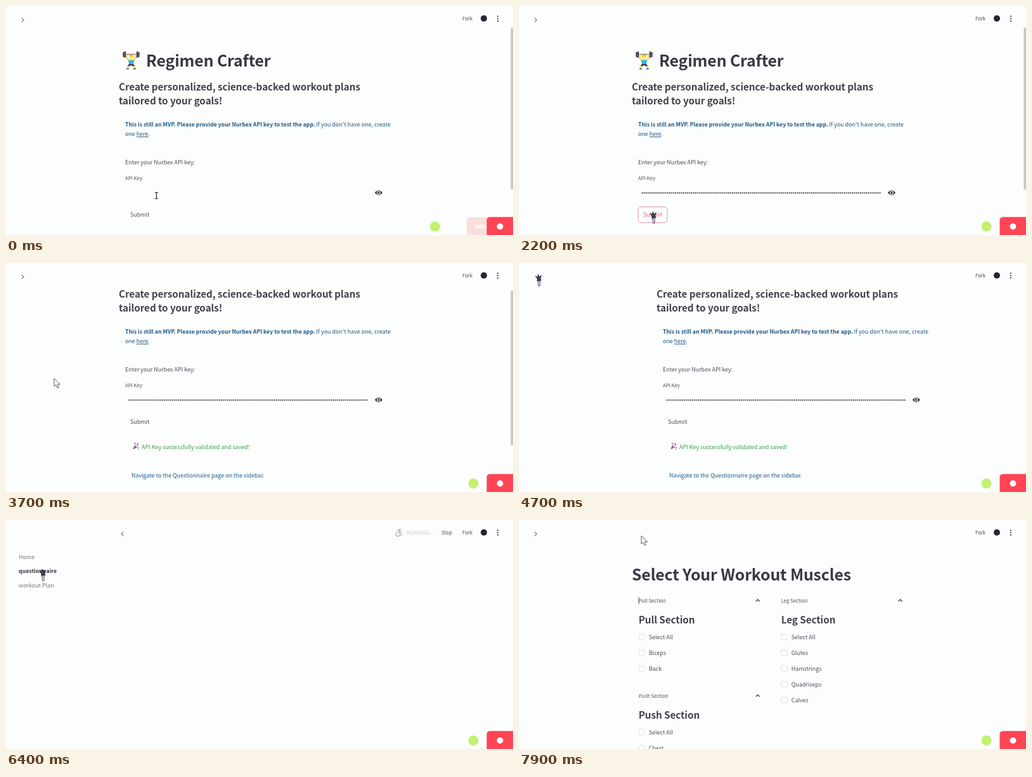
Animation, 800 px wide and 363 px high, one loop 8 s. Source, as an HTML page:

```html
<!DOCTYPE html>
<html lang="en">
<head>
<meta charset="utf-8">
<title>Regimen Crafter</title>
<style>
html, body { margin: 0; width: 100%; height: 100%; overflow: hidden; background: #fcfefd; }
svg { display: block; width: 800px; height: 363px; }
text { font: 8.95px "Noto Sans CJK JP", "Noto Sans CJK SC", "Noto Sans CJK", sans-serif; fill: #4c4d57; white-space: pre; }
.h1 { font-size: 24.8px; font-weight: 700; letter-spacing: -.12px; fill: #393842; }
.h3 { font-size: 15.25px; font-weight: 700; letter-spacing: -.07px; fill: #43424c; }
.small { font-size: 7.75px; }
.info, .info tspan { fill: #1f5684; }
.strong { font-size: 8.73px; font-weight: 700; }
.hint { font-size: 6.68px; font-style: italic; fill: #a3a4aa; }
.nav { fill: #74757d; }
.nav.on { font-size: 8.75px; font-weight: 700; fill: #31333f; }
.line { fill: none; stroke: #73747c; stroke-width: 1.1; }
.box { fill: #fdfefe; stroke: #dcdde2; }
</style>
</head>
<body>
<svg viewBox="0 0 800 363">
  <rect width="800" height="363" fill="#fcfefd"/>

  <g id="home">
    <g id="lifter">
      <path d="M184 76.5H211" stroke="#6a6674" stroke-width="1.2"/>
      <path d="M185.5 73V81M188 72V82M207 72V82M209.500 73V81" stroke="#453a55" stroke-width="2.2"/>
      <path d="M191.500 76.500L190.500 82.500L194 87M203.500 76.500L204.500 82.500L201 87" fill="none" stroke="#f8d648" stroke-width="2.2"/>
      <path d="M193 85.500H202L201 92.500H194Z" fill="#35b5dc"/>
      <circle cx="197.500" cy="81" r="3.500" fill="#fbe36a"/>
      <path d="M194 80A3.500 3.500 0 0 1 201 80Z" fill="#e8bd2c"/>
      <path d="M194 92H201L204 95.500H200L197.500 94L195 95.500H191Z" fill="#39405c"/>
      <path d="M191.500 94.500L193 99M203.500 94.500L202 99" stroke="#f8d648" stroke-width="2.2"/>
      <path d="M190 99.500H194M201 99.500H205" stroke="#39405c" stroke-width="1.4"/>
    </g>
    <text class="h1" x="221" y="96">Regimen Crafter</text>
    <text class="h3" x="178" y="134">Create personalized, science-backed workout plans</text>
    <text class="h3" x="178" y="155.500">tailored to your goals!</text>
    <text class="info strong" x="188" y="191">This is still an MVP. Please provide your Nurbex API key to test the app.</text>
    <text class="info" x="489.500" y="191">If you don't have one, create</text>
    <text class="info" x="188" y="206">one <tspan text-decoration="underline">here</tspan>.</text>
    <text x="188" y="250.700">Enter your Nurbex API key:</text>
    <text class="small" x="188" y="276">API Key</text>
    <rect id="field" x="188" y="283.500" width="420" height="25" rx="5" fill="none" stroke="#dc8fa4"/>
    <path id="dots" d="M194.500 296.300H572" stroke="#3b3c47" stroke-width="2.2" stroke-linecap="round" stroke-dasharray="0 3.1"/>
    <text id="hint" class="hint" x="521" y="304.500">Press Enter to submit form</text>
    <path d="M582 296Q588 288.500 594 296Q588 303.500 582 296Z" fill="#31333f"/>
    <circle cx="588" cy="296" r="2.300" fill="#31333f" stroke="#fcfefd" stroke-width="1.100"/>
    <rect id="button" x="188" y="318.500" width="46" height="25" rx="5" fill="none" stroke="#dc9aa9"/>
    <text id="submit" x="196" y="334.300">Submit</text>
    <g id="success">
      <path d="M200 374.500L203 367.500L207 371.500Z" fill="#8a6a9c"/>
      <path d="M204 367L205 364.500M206 369L209 366M207 371L210 371.500" stroke="#d2507a" stroke-width="1.200"/>
      <path d="M202 365H203.500M207 365H208.500M208 374H209.500" stroke="#3f78c0" stroke-width="1.400"/>
      <text x="214" y="374" style="fill:#3a9d55">API Key successfully validated and saved!</text>
      <text class="info" x="198" y="419.300">Navigate to the Questionnaire page on the sidebar.</text>
    </g>
  </g>

  <g id="muscles">
    <text class="h1" x="178" y="96">Select Your Workout Muscles</text>
  </g>

  <rect width="800" height="37" fill="#fcfefd"/>
  <path id="open" class="line" d="M24.500 18.700L28 22L24.500 25.300"/>
  <g id="side">
    <path class="line" d="M185.500 18.700L182 22L185.500 25.300"/>
    <text class="nav" x="20" y="61.700">Home</text>
    <text class="nav" x="20" y="84.300">questionnaire</text>
    <text class="nav" x="20" y="106.800">workout Plan</text>
  </g>
  <g id="running">
    <circle cx="621.500" cy="15" r="1.300" fill="#a5a6ab"/>
    <path d="M616.500 17L620.500 16.500L619.500 20.500L623.500 21.500V25.500M621 18L625 18.500M617 19.500A3.300 3.300 0 1 0 621.500 23.500" fill="none" stroke="#a5a6ab" stroke-width="1.200"/>
    <text class="small" x="632" y="23" style="font-size:8.05px;fill:#cbccd0">RUNNING...</text>
    <text class="small" x="687" y="23">Stop</text>
  </g>
  <text class="small" x="720" y="22.800">Fork</text>
  <circle cx="754" cy="19.800" r="5" fill="#25262f"/>
  <path d="M776 16.300V24" stroke="#31333f" stroke-width="2.200" stroke-linecap="round" stroke-dasharray="0 3.700"/>
  <rect id="thumb" x="796.500" width="3.500" rx="1.500" fill="#c4c6c8"/>

  <g id="flap">
    <path d="M0 363V340Q0 335 5 335H60V363Z" fill="#f9dedb"/>
    <path d="M13 349.500H32" stroke="#fdf3f1" stroke-width="6"/>
  </g>
  <circle id="avatar" cy="349.500" r="8" fill="#c3f173"/>
  <path d="M758.500 363V340Q758.500 334.500 764 334.500H800V363Z" fill="#ff4455"/>
  <circle cx="779.500" cy="349.500" r="5" fill="#fff"/>

  <g id="cursor">
    <path id="beam" d="M-2.500 -5H2.500M-2.500 5H2.500M0 -5V5" stroke="#222" stroke-width="1.200"/>
    <path id="arrow" d="M0 0V13L3 10.300L5.200 15.300L7.500 14.300L5.300 9.500H9.500Z" fill="#fff" stroke="#4a4a50" stroke-width=".9"/>
    <g id="hand">
      <path d="M-1.500 2L-.5 11.500H2L2.500 2Z" fill="#c9c8d2" stroke="#4d4860" stroke-width=".8"/>
      <path d="M-6 -5L-2 -3L-1 -8L1 -3.500L5 -6L3 -1L4.500 2.500L1 3.500L-2.500 4L-2.500 0Z" fill="#302944"/>
      <path d="M-2 -1L1 -2M0 2L2.500 0" stroke="#8580a0" stroke-width=".9"/>
    </g>
  </g>
</svg>
<script>
const $ = id => document.getElementById(id);
const show = (id, on) => $(id).style.display = on ? "" : "none";
const move = (id, x, y) => $(id).setAttribute("transform", `translate(${x} ${y})`);
const ramp = (t, a, b) => Math.min(1, Math.max(0, (t - a) / (b - a)));
const ease = k => k * k * (3 - 2 * k);
const during = (t, ...spans) => spans.some(([a, b]) => t >= a && t < b);

const SIDE = 206;
const path = [
  [0, 237.4, 300.5], [1000, 237, 298], [1400, 215, 322], [1800, 212, 333], [2400, 212, 333],
  [2750, 128, 300], [3100, 128, 300], [3600, 78, 190], [4400, 31, 25], [5000, 31, 25],
  [5700, 58, 84], [6600, 58, 85], [7150, 183, 23], [7500, 184, 23], [7800, 193, 25], [8000, 193, 25]
];

function section(x, y, name, items) {
  let out = `<text class="small" x="${x}" y="${y + 3}">${name}</text>
    <path class="line" style="stroke:#4b4c55;stroke-width:1.5" d="M${x + 185} ${y + 1.5}l3 -3l3 3"/>
    <text class="h3" x="${x}" y="${y + 36.5}">${name}</text>`;
  ["Select All", ...items].forEach((item, i) => {
    const row = y + 58 + i * 25;
    out += `<rect class="box" x="${x + .5}" y="${row - 4.5}" width="9" height="9" rx="2"/>
      <text x="${x + 16}" y="${row + 3.5}">${item}</text>`;
  });
  return out;
}

$("muscles").innerHTML +=
  section(188.7, 127.5, "Pull Section", ["Biceps", "Back"]) +
  section(188.7, 278.5, "Push Section", ["Chest"]) +
  section(413.7, 127.5, "Leg Section", ["Glutes", "Hamstrings", "Quadriceps", "Calves"]) +
  '<path id="caret" d="M189 122V133" stroke="#55565f"/>';

const links = document.querySelectorAll(".nav");

function cursorAt(t) {
  const i = path.findIndex(p => p[0] > t);
  const [a, x, y] = path[i - 1], [b, x2, y2] = path[i];
  const k = ease(ramp(t, a, b));
  return [x + (x2 - x) * k, y + (y2 - y) * k];
}

function draw(t) {
  const width = SIDE * (ramp(t, 4600, 4867) - ramp(t, 7300, 7567));
  const scroll = 67.5 * ease(ramp(t, 2500, 2900)) + 11.5 * ease(ramp(t, 3100, 3400));
  move("home", width / 2, -scroll);
  move("muscles", width / 2, 0);
  move("side", width - SIDE, 0);
  show("home", t < 6200);
  show("muscles", t >= 6700);
  show("running", during(t, [6100, 6800]));
  show("open", width === 0 && !during(t, [4400, 4601]));
  show("side", width > SIDE / 2);
  links.forEach((link, i) => link.classList.toggle("on", i === (t < 6100 ? 0 : 1)));

  const hot = during(t, [1500, 3400]);
  show("field", during(t, [500, 2100]));
  show("dots", t >= 800);
  show("hint", during(t, [800, 2100]));
  show("button", hot);
  $("submit").style.fill = hot ? "#d5647b" : "";
  show("success", t >= 2500);
  show("caret", t >= 7600);

  show("thumb", t < 4600);
  $("thumb").setAttribute("y", 34 + scroll * .118);
  $("thumb").setAttribute("height", t < 2500 ? 257 : 246);

  const slide = ease(ramp(t, 0, 400));
  move("flap", 727 + 33 * slide, 0);
  $("avatar").setAttribute("cx", 677 + 60.5 * slide);

  const hand = during(t, [1600, 2450], [4350, 5050], [5600, 6650], [7100, 7600]);
  show("beam", t < 1100);
  show("hand", hand);
  show("arrow", t >= 1100 && !hand);
  move("cursor", ...cursorAt(t));
}

function tick(now) {
  draw(now % 8000);
  requestAnimationFrame(tick);
}
draw(0);
requestAnimationFrame(tick);
</script>
</body>
</html>
```
